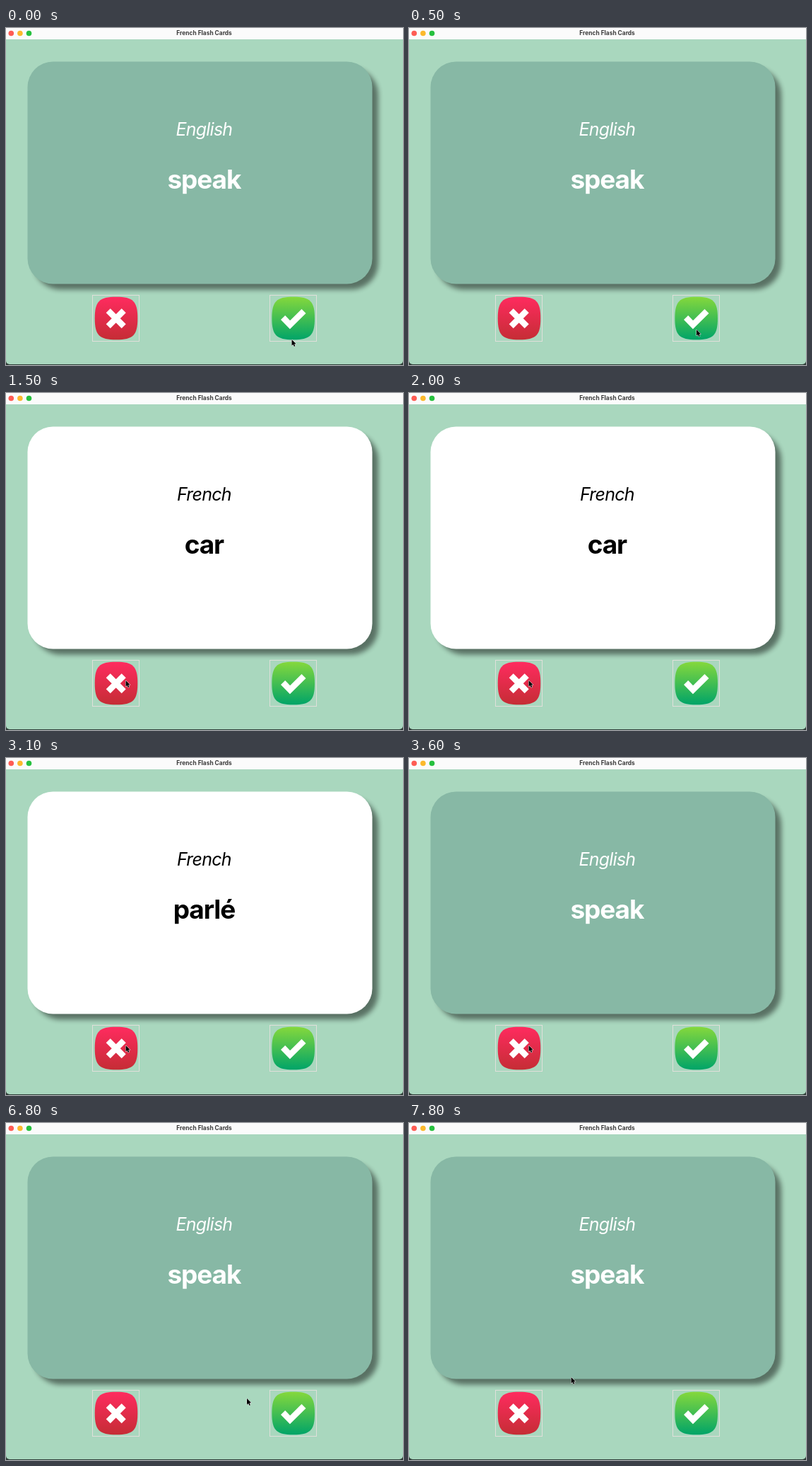
An HTML page that plays this animation: 562x476 px, repeating every 8000 ms.

```html
<!DOCTYPE html>
<html lang="en">
<head>
<meta charset="utf-8">
<title>French Flash Cards</title>
<style>
  html, body { margin: 0; width: 100%; height: 100%; overflow: hidden; background: #2f3d38; }
  svg { display: block; width: 562px; height: 476px; }
  text { font-family: Inter, "Liberation Sans", sans-serif; text-anchor: middle; }
  #language { font-size: 25px; font-style: italic; letter-spacing: -.75px; }
  #word { font-size: 37px; font-weight: 700; letter-spacing: -1.1px; }
  .title { font-size: 8.4px; font-weight: 700; fill: #3a3a3a; }
  .mark { fill: none; stroke: #fff; stroke-width: 8.6; }
  .frame { fill: none; stroke: #e0dfda; }
</style>
</head>
<body>
<svg viewBox="0 0 562 476">
  <defs>
    <linearGradient id="red" x2="0" y2="1">
      <stop stop-color="#ff2b5f"/><stop offset="1" stop-color="#c52d35"/>
    </linearGradient>
    <linearGradient id="green" x2="0" y2="1">
      <stop stop-color="#85d83c"/><stop offset="1" stop-color="#00a468"/>
    </linearGradient>
    <filter id="blur"><feGaussianBlur stdDeviation="3.5"/></filter>
    <path id="tile" d="M-30.3 0C-30.3-24-24-30.3 0-30.3S30.3-24 30.3 0 24 30.3 0 30.3-30.3 24-30.3 0Z"/>
    <rect id="frame" class="frame" x="-33" y="-32.5" width="66" height="65"/>
  </defs>

  <rect width="562" height="475" rx="5" fill="#a9d7be"/>
  <rect width="562" height="16" fill="#fbfbfb"/>
  <g id="lights"></g>
  <text class="title" x="280.6" y="10.3">French Flash Cards</text>

  <rect x="39" y="56.5" width="488" height="313" rx="38" opacity=".47" filter="url(#blur)"/>
  <rect id="card" x="30.5" y="47.5" width="488" height="314" rx="36"/>
  <text id="language" x="280.4" y="152"></text>
  <text id="word" x="280.4" y="227"></text>

  <g transform="translate(155.5 410)">
    <use href="#frame"/><use href="#tile" x=".5" fill="url(#red)"/>
    <path class="mark" d="M-10.8-10.8 11.2 11.2M-10.8 11.2 11.2-10.8"/>
  </g>
  <g transform="translate(406.5 410)">
    <use href="#frame"/><use href="#tile" x=".2" fill="url(#green)"/>
    <path class="mark" d="M-14.4-1-4.5 9.2 15-10"/>
  </g>

  <path id="cursor" d="M0 0V8.8L2 7 3.4 10 4.9 9.3 3.6 6.5 6.2 6.2Z"
        stroke="#fff" paint-order="stroke"/>
</svg>
<script>
  const LOOP = 8000, STEP = 100;
  const CLICK_CHECK = 600, CLICK_CROSS = 3000, FLIP_DELAY = 3000;
  const get = id => document.getElementById(id);

  get('lights').innerHTML = ['#fe5c54', '#fcb92c', '#27c13f'].map((color, i) =>
    `<circle cx="${7.3 + 12.6 * i}" cy="7.5" r="3.8" fill="${color}"/>`).join('');

  // Pointer glides; longer ones take more time
  const home = { x: 404.5, y: 440 };
  const glides = [
    { start: 300, x: 407, y: 426 },
    { start: 900, x: 169.5, y: 406 },
    { start: 5500, x: 180, y: 418 },
    { start: 5900, x: 229, y: 407 },
    { start: 6300, x: 315, y: 385 },
    { start: 6700, x: 385, y: 396 },
    { start: 7350, x: 229.5, y: 359 }
  ];

  function pointerAt(time) {
    let { x, y } = home;
    for (const to of glides) {
      const dx = to.x - x, dy = to.y - y;
      const duration = 100 + 2 * Math.hypot(dx, dy);
      const p = Math.min(1, Math.max(0, (time - to.start) / duration));
      const eased = p * p * (3 - 2 * p);
      x += dx * eased;
      y += dy * eased;
      if (p < 1) break;
    }
    return [x, y];
  }

  function show(id, label, color) {
    get(id).textContent = label;
    get(id).setAttribute('fill', color);
  }

  function draw(now) {
    const time = Math.floor(now % LOOP / STEP) * STEP;
    const isFrench = time >= CLICK_CHECK && time < CLICK_CHECK + FLIP_DELAY;
    const ink = isFrench ? '#000' : '#fff';
    const frenchWord = time < CLICK_CROSS ? 'car' : 'parlé';
    get('card').setAttribute('fill', isFrench ? '#fff' : '#87b8a5');
    show('language', isFrench ? 'French' : 'English', ink);
    show('word', isFrench ? frenchWord : 'speak', ink);
    get('cursor').setAttribute('transform', `translate(${pointerAt(time)})`);
  }

  const start = performance.now();
  function tick() {
    draw(performance.now() - start);
    requestAnimationFrame(tick);
  }
  tick();
</script>
</body>
</html>
```
